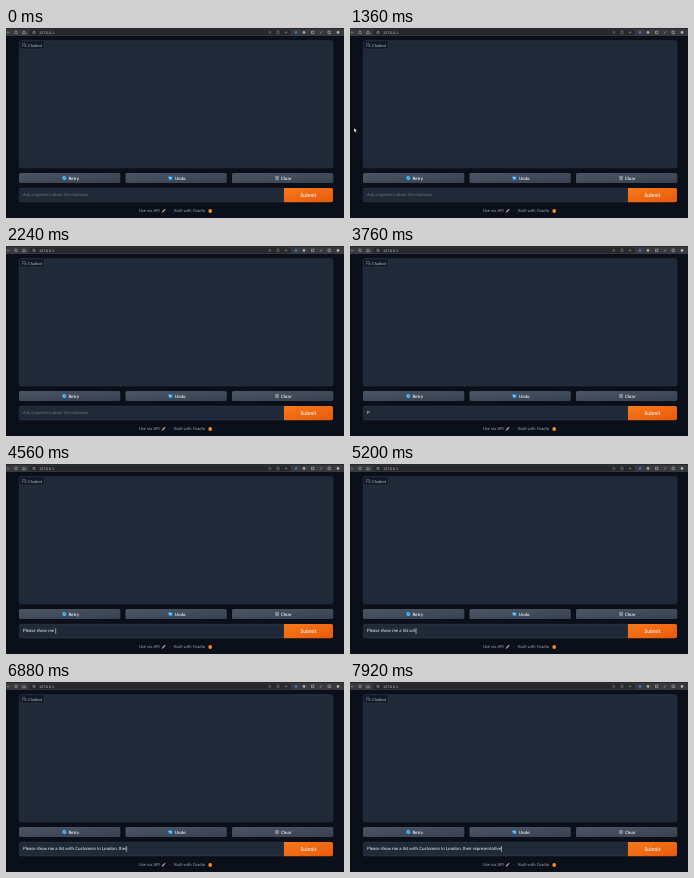
These frames come from a looping animation (338 px wide and 190 px high, 8000 ms). An HTML page:

```html
<!DOCTYPE html>
<html lang="en">
<head>
<meta charset="utf-8">
<title>Chat page</title>
<style>
  html, body { margin: 0; width: 100%; height: 100%; overflow: hidden; background: #0b0f19; }
  svg { display: block; width: 100%; height: 100%; }
  text { font: 4.47px Lato, sans-serif; fill: #f3f4f6; white-space: pre; text-rendering: geometricPrecision; }
  .label { font-weight: 600; }
  .footer { font-size: 4.2px; fill: #9ca3af; }
  .line { fill: none; stroke: #b6b8bc; stroke-width: .6; }
  .dim { stroke: #77797d; }
</style>
</head>
<body>
<svg viewBox="0 0 338 190" preserveAspectRatio="none">
  <defs>
    <linearGradient id="gray" x2="1" y2="1"><stop stop-color="#4b5563"/><stop offset="1" stop-color="#374151"/></linearGradient>
    <linearGradient id="grayHover" x2="1" y2="1"><stop stop-color="#566070"/><stop offset="1" stop-color="#4b5563"/></linearGradient>
    <linearGradient id="orange" x2="1" y2="1"><stop stop-color="#f77a1b"/><stop offset="1" stop-color="#e8590c"/></linearGradient>
  </defs>
  <rect width="338" height="190" fill="#0b0f19"/>

  <!-- Browser bar -->
  <rect width="338" height="8" fill="#38393d"/>
  <rect width="338" height=".8" fill="#242528"/>
  <rect x="23" y="1.5" width="262" height="5.8" rx="2.9" fill="#27282b"/>
  <path class="line dim" d="M1 4.4h3M2.4 3L1 4.4 2.4 5.8"/>
  <circle class="line" cx="10" cy="4.4" r="1.3"/>
  <path class="line" d="M16.6 5.8V4.2L18 3l1.4 1.2v1.6z"/>
  <circle class="line" cx="28" cy="4.4" r="1.1"/>
  <text x="33" y="5.6" style="font-size:3.6px;fill:#b9bbc0">127.0.0.1</text>
  <path class="line dim" d="M263 3v2.8M264.5 3v2.8M271 3h2v2.6h-2zM278.5 4.4h3M280 3v2.8"/>
  <circle cx="290" cy="4.4" r="1.4" fill="#3c6fc4"/>
  <circle cx="298" cy="4.4" r="1.3" fill="#a9abb0"/>
  <path class="line" d="M305.5 3.2h2.4v2.4h-2.4zM314 5.8l2-2.6M322 3.2h2.4v2.4H322z"/>
  <circle cx="332" cy="4.4" r="1.3" fill="#b6b8bc"/>

  <!-- Chat panel -->
  <rect x="13.3" y="12.8" width="313.6" height="127" rx="1.6" fill="#1f2937" stroke="#374151" stroke-width=".5"/>
  <path d="M13.3 21V14.4q0-1.6 1.6-1.6H38v6.6q0 1.6-1.6 1.6z" fill="#111827" stroke="#374151" stroke-width=".4"/>
  <path class="line" d="M16.4 15.4h2.8v2h-1.6l-1.2 1zM18.2 18.3h1.2l.8.7v-2.4" style="stroke:#9ca3af;stroke-width:.4"/>
  <text x="22" y="18.7" style="font-size:4px;fill:#b3bac6">Chatbot</text>

  <g id="buttons"></g>

  <!-- Input row -->
  <path d="M278 160.3H15q-1.7 0-1.7 1.7v10.2q0 1.7 1.7 1.7h263z" fill="#1f2937" stroke="#374151" stroke-width=".5"/>
  <path d="M278 160h47.2q1.8 0 1.8 1.8v10.6q0 1.8-1.8 1.8H278z" fill="url(#orange)"/>
  <text class="label" x="302.5" y="169" text-anchor="middle" style="font-size:5.2px">Submit</text>
  <text id="placeholder" x="17" y="168.3" style="font-size:4.32px;fill:#6b7280">Ask a question about the database</text>
  <text id="typed" x="17" y="168.3"></text>
  <rect id="caret" y="164.2" width=".6" height="5.6" fill="#e5e7eb"/>

  <!-- Footer -->
  <text class="footer" x="133" y="184.4">Use via API</text>
  <path d="M156 184.6l.6-1.8 2.4-2 .6.5-1.8 2.5z" fill="#b9a49a"/>
  <path d="M155.8 184.8l.4-1.4 1 1z" fill="#e8702a"/>
  <text class="footer" x="163.6" y="184.4">·</text>
  <text class="footer" x="168" y="184.4">Built with Gradio</text>
  <circle cx="204.2" cy="183" r="1.9" fill="#f28a1e"/>

  <path id="arrow" d="M0 0v4l1-.8.7 1.5.7-.3-.7-1.5 1.3-.1z" fill="#fff" stroke="#111" stroke-width=".3"/>
  <path id="beam" d="M-.8-2H.8M0-2V2M-.8 2H.8" stroke="#d1d5db" stroke-width=".5"/>
</svg>
<script>
const LOOP = 8000, STEP = 80, TYPING_START = 3760, TEXT_X = 17;
const message = "Please show me a list with Customers in London, their representative";

// [time, number of characters typed]
const typing = [[3760, 1], [4560, 15], [5440, 29], [5520, 31], [5600, 31], [5920, 36], [6480, 45],
  [6560, 47], [6640, 47], [6720, 49], [6880, 52], [6960, 53], [7040, 53], [7120, 55], [7920, 68]];
// [time, x, y]
const pointerPath = [[1360, 4, 100], [1680, 58, 152], [1920, 118, 162], [2160, 195, 158]];

const byId = id => document.getElementById(id);
const show = (node, visible) => node.setAttribute("visibility", visible ? "visible" : "hidden");

const blueBox = '<rect x="-2.1" y="-2.1" width="4.2" height="4.2" rx=".7" fill="#1783d0"/>';
const buttons = [
  { x: 13, label: "Retry", iconX: 58.3, textX: 62.4,
    icon: blueBox + '<path d="M-1.1.2A1.1 1.1 0 0 1 .9-.7M1.1-.2A1.1 1.1 0 0 1-.9.7" fill="none" stroke="#fff" stroke-width=".6"/>' },
  { x: 119.5, label: "Undo", iconX: 164.4, textX: 168.8,
    icon: blueBox + '<path d="M-1.2-.4H.7q.7.6 0 1.3H-.5M-.5-1.1l-.7.7.7.7" fill="none" stroke="#fff" stroke-width=".6"/>' },
  { x: 226, label: "Clear", iconX: 271, textX: 275,
    icon: '<path d="M-1.6-1.6h3.2l-.4 3.4h-2.4z" fill="#7d8793" stroke="#b5bdc7" stroke-width=".4"/>' }
];
byId("buttons").innerHTML = buttons.map(b => `
  <rect x="${b.x}" y="145" width="101.3" height="10" rx="1.6" fill="url(#gray)"/>
  <g transform="translate(${b.iconX} 150)">${b.icon}</g>
  <text class="label" x="${b.textX}" y="151.6">${b.label}</text>`).join("");
const buttonRects = [...document.querySelectorAll("#buttons > rect")];

function interpolate(keys, time, column) {
  const next = keys.findIndex(key => key[0] > time);
  if (next < 0) return keys[keys.length - 1][column];
  if (next === 0) return keys[0][column];
  const a = keys[next - 1], b = keys[next];
  return a[column] + (b[column] - a[column]) * (time - a[0]) / (b[0] - a[0]);
}

function drawPointer(time) {
  const active = time >= 1360 && time < 2240;
  const x = interpolate(pointerPath, time, 1), y = interpolate(pointerPath, time, 2);
  const overInput = y > 156;
  for (const id of ["arrow", "beam"]) byId(id).setAttribute("transform", `translate(${x} ${y})`);
  show(byId("arrow"), active && !overInput);
  show(byId("beam"), active && overInput);
  buttons.forEach((b, i) => {
    const hover = active && x > b.x && x < b.x + 101 && y > 145 && y < 155;
    buttonRects[i].setAttribute("fill", hover ? "url(#grayHover)" : "url(#gray)");
  });
}

function drawInput(time) {
  const started = time >= TYPING_START;
  const typed = byId("typed");
  typed.textContent = started ? message.slice(0, Math.round(interpolate(typing, time, 1))) : "";
  show(byId("placeholder"), !started);
  const blinkedOff = time < 3840 || (time >= 5600 && time < 6080);
  show(byId("caret"), started && !blinkedOff);
  if (started) byId("caret").setAttribute("x", TEXT_X + typed.getComputedTextLength() + .2);
}

function frame(now) {
  const time = Math.floor(now % LOOP / STEP) * STEP;
  drawPointer(time);
  drawInput(time);
  requestAnimationFrame(frame);
}
frame(0);
</script>
</body>
</html>
```
